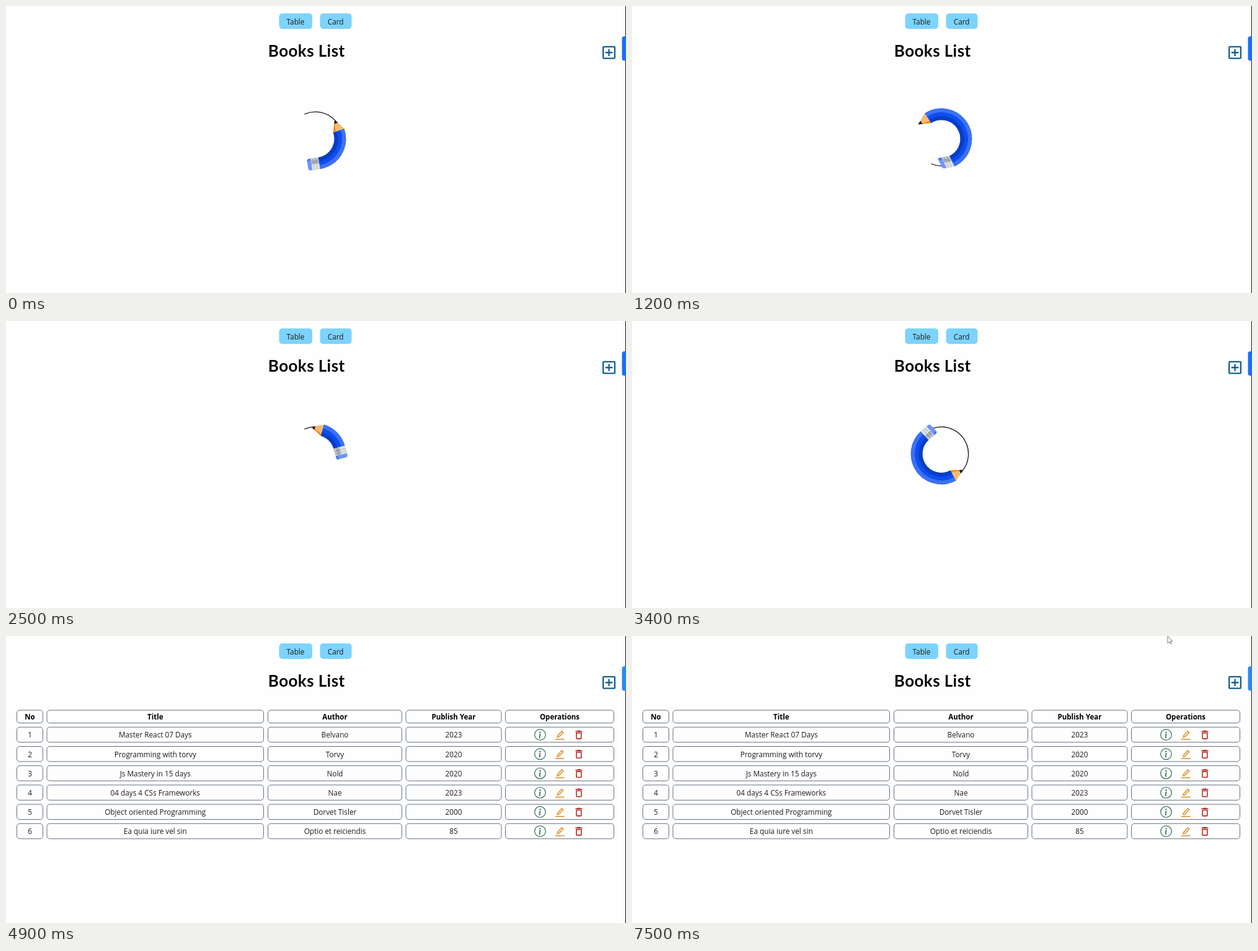
Write an HTML page that moves like this. It is 1000x464 px and loops after 7900 ms.

```html
<!DOCTYPE html>
<html lang="en">
<head>
<meta charset="utf-8">
<title>Books List</title>
<style>
html, body { margin: 0; width: 100%; height: 100%; overflow: hidden; background: #fefefe; }
svg { display: block; }
text { font: 11.75px "Open Sans", "Noto Sans", sans-serif; text-anchor: middle; fill: #1c1c1c; }
.head { font-size: 11.5px; font-weight: 700; fill: #000; }
.title { font: 700 26px Lato, sans-serif; letter-spacing: .4px; fill: #050505; }
.cell { fill: none; stroke: #64707f; }
</style>
</head>
<body>
<svg id="stage" width="1000" height="464" viewBox="0 0 1000 464">
  <defs>
    <clipPath id="eraserClip"><rect rx="5" width="30" height="30"/></clipPath>
    <g id="info" fill="#2b6650">
      <circle cx="8" cy="8" r="7.5" fill="none" stroke="#2b6650"/>
      <path d="m8.93 6.588-2.29.287-.082.38.45.083c.294.07.352.176.288.469l-.738 3.468c-.194.897.105 1.319.808 1.319.545 0 1.178-.252 1.465-.598l.088-.416c-.2.176-.492.246-.686.246-.275 0-.375-.193-.304-.533z"/>
      <circle cx="8" cy="4.5" r="1"/>
    </g>
    <path id="edit" fill="none" stroke="#d98e24" stroke-width="1.9" stroke-linejoin="round"
      d="M16.1 3.8 19 6.75 9.7 16 6.6 16.6 7.2 13.5ZM2.6 20.5H21.4"/>
    <path id="bin" fill="none" stroke="#b3261e" stroke-width="2"
      d="M7 8V19a1 1 0 0 0 1 1h8a1 1 0 0 0 1-1V8ZM5 5H19M9 4H15"/>
  </defs>

  <rect x="440.5" y="12" width="53.5" height="25" rx="5" fill="#7dd3fc"/>
  <rect x="506.5" y="12" width="51" height="25" rx="5" fill="#7dd3fc"/>
  <text x="467" y="29.5">Table</text>
  <text x="531.7" y="29.5">Card</text>
  <text class="title" x="484.7" y="82">Books List</text>
  <g transform="translate(958.5 61.2) scale(1.17)" fill="none" stroke="#14608a" stroke-width="2">
    <rect x="4" y="4" width="16" height="16" rx="1"/>
    <path d="M7 12H17M12 7V17"/>
  </g>
  <path d="M999.5 0V464" stroke="#111"/>
  <rect id="tab" x="993.5" y="49" width="12" height="39.5" rx="4"/>

  <g id="loader" transform="translate(499 214.8) scale(.623)">
    <circle id="line" r="70" fill="none" stroke="#111" stroke-width="2" stroke-linecap="round" pathLength="1"/>
    <g id="pencil">
      <g id="body" fill="none">
        <circle r="64" stroke="hsl(223,90%,50%)" stroke-width="30" pathLength="1"/>
        <circle r="74" stroke="hsl(223,90%,60%)" stroke-width="10" pathLength="1"/>
        <circle r="54" stroke="hsl(223,90%,40%)" stroke-width="10" pathLength="1"/>
      </g>
      <g id="eraser">
        <g id="skew">
          <rect fill="hsl(223,90%,70%)" rx="5" width="30" height="30"/>
          <rect fill="hsl(223,90%,60%)" width="5" height="30" clip-path="url(#eraserClip)"/>
          <rect fill="hsl(223,10%,90%)" width="30" height="20"/>
          <rect fill="hsl(223,10%,70%)" width="15" height="20"/>
          <rect fill="hsl(223,10%,80%)" width="5" height="20"/>
          <path fill="hsla(223,10%,10%,.2)" d="M0 6h30v2H0ZM0 13h30v2H0Z"/>
        </g>
      </g>
      <g id="point">
        <path fill="hsl(33,90%,70%)" d="M15 0 30 30H0Z"/>
        <path fill="hsl(33,90%,50%)" d="M15 0 6 30H0Z"/>
        <path fill="hsl(223,10%,10%)" d="M15 0 20 10H10Z"/>
      </g>
    </g>
  </g>

  <g id="table"></g>
  <path id="cursor" d="M0 0V11.2L2.6 8.9 4.3 12.6 6 11.9 4.4 8.2H8Z" fill="#fff" stroke="#555" stroke-width=".8"/>
</svg>
<script>
const $ = id => document.getElementById(id);
const columns = [[17.5, 42], [66, 349.5], [422.5, 216], [645, 154], [805.5, 175]];
const books = [
  ['Master React 07 Days', 'Belvano', 2023],
  ['Programming with torvy', 'Torvy', 2020],
  ['Js Mastery in 15 days', 'Nold', 2020],
  ['04 days 4 CSs Frameworks', 'Nae', 2023],
  ['Object oriented Programming', 'Dorvet Tisler', 2000],
  ['Ea quia iure vel sin', 'Optio et reiciendis', 85]
];

const row = (cells, y, h, base, cls = '') => columns.map(([x, w], i) =>
  `<rect class="cell" x="${x}" y="${y}" width="${w}" height="${h}" rx="4.5"/>
   <text class="${cls}" x="${x + w / 2}" y="${y + base}">${cells[i]}</text>`).join('');
const icon = (id, x, y, scale) =>
  `<use href="#${id}" transform="translate(${x} ${y}) scale(${scale})"/>`;

$('table').innerHTML =
  row(['No', 'Title', 'Author', 'Publish Year', 'Operations'], 120, 20.7, 15, 'head') +
  books.map((book, i) => {
    const y = 147.3 + 31.2 * i;
    return row([i + 1, ...book, ''], y, 24.5, 17) +
      icon('info', 852.1, y + 3, 1.17) + icon('edit', 883.9, y + 3.6, .78) + icon('bin', 914.6, y + 3.2, .78);
  }).join('');

const wobble = [-15, 15, -15, 15, -15, 8, -4, 0, 0];
function skewAt(p) {
  const q = Math.min(Math.abs(p - .5) / .025, 7), i = Math.floor(q), f = q - i;
  return wobble[i] + (wobble[i + 1] - wobble[i]) * f * f * (3 - 2 * f);
}

const turn = (id, value) => $(id).setAttribute('transform', value);
const show = (id, on) => { $(id).style.display = on ? '' : 'none'; };

function drawLoader(p) {
  const half = 1 - Math.abs(2 * p - 1);
  const back = -90 - 135 * half;
  turn('pencil', `rotate(${720 * p})`);
  turn('body', `rotate(${back})`);
  $('body').setAttribute('stroke-dasharray', `${.125 + .5 * half} 2`);
  turn('point', `rotate(${back}) translate(49 -30)`);
  turn('eraser', `rotate(${45 * half - 45}) translate(49 0)`);
  turn('skew', `skewX(${skewAt(p)})`);

  // the line grows from its start, then is rubbed out towards its end
  const length = p < .5 ? 1.25 * p : .625 - 2.5 * (p - .5);
  show('line', length > 0);
  $('line').setAttribute('stroke-dasharray', `${Math.max(length, 0)} 2`);
  turn('line', `rotate(${p < .5 ? -113 : -113 + 900 * (p - .5)})`);
}

function draw(now) {
  const t = Math.floor(now % 7900 / 100) * 100;
  const loading = t < 4900;
  show('loader', loading);
  show('table', !loading);
  show('cursor', t >= 7400);
  $('tab').setAttribute('fill', loading ? '#1a6ff6' : '#2a88f2');
  if (loading) drawLoader((t / 3000 + .203 - .047 * Math.max(0, 1 - t / 400)) % 1);
  turn('cursor', `translate(864 ${t < 7500 ? -7 : .3})`);
  requestAnimationFrame(draw);
}
draw(0);
</script>
</body>
</html>
```
